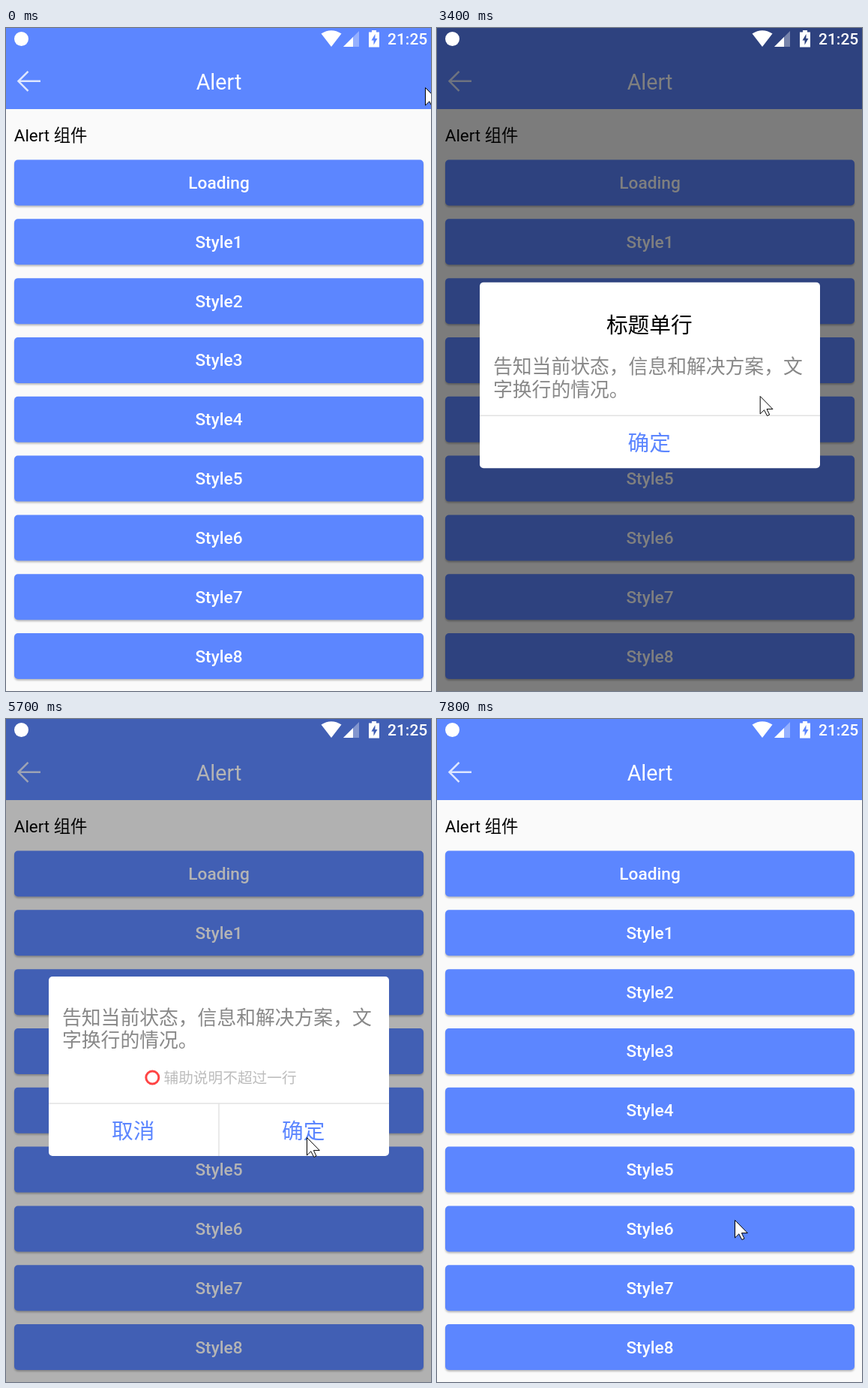
Animation, 567 px wide and 883 px high, one loop 8000 ms. Source, as an HTML page:

```html
<!DOCTYPE html>
<html lang="zh-CN">
<head>
<meta charset="utf-8">
<title>Alert</title>
<style>
html, body { margin: 0; width: 100%; height: 100%; overflow: hidden; background: #fafafa; }
svg { display: block; width: 567px; height: 883px; }
text { font-family: Roboto, "Noto Sans CJK SC", "Noto Sans CJK", sans-serif; }
.mid { text-anchor: middle; }
.btn { fill: #5c86ff; filter: drop-shadow(0 2px 1px rgba(0, 0, 0, .25)); }
.label { font-size: 22.7px; font-weight: 500; fill: #fff; }
.title { font-size: 28.7px; fill: #000; }
.msg { font-size: 25.8px; fill: #888; }
.hint { font-size: 19.7px; fill: #bdbdbd; }
.action { font-size: 28.7px; fill: #5c86ff; }
.rule { stroke: #e2e2e2; stroke-width: 1.4; }
</style>
</head>
<body>
<svg viewBox="0 0 567 883">
  <rect width="567" height="883" fill="#fafafa"/>
  <rect width="567" height="108" fill="#5c86ff"/>
  <path d="M46 70.8H17M29.5 57.8L16.5 70.8L29.5 83.8" fill="none" stroke="#fff" stroke-opacity=".8" stroke-width="2.5"/>
  <text class="mid" x="284" y="81.7" font-size="28.7" fill="#fff">Alert</text>
  <text x="10.8" y="150.5" font-size="22.4">Alert 组件</text>
  <g id="buttons"></g>
  <rect id="dim" width="567" height="883"/>
  <g fill="#fff">
    <circle cx="20.5" cy="14.5" r="9.5"/>
    <path d="M434 25L420.5 7.5Q434-1 447.5 7.5Z"/>
    <path d="M450 25H471V4Z" opacity=".35"/>
    <path d="M450 25H463V12Z"/>
    <path fill-rule="evenodd" d="M488 3h6v2.5h4V25.5h-14V5.5h4ZM492.5 8l-5 8.5h3v6l5-8.5h-3Z"/>
    <text x="509" y="22" font-size="21" font-weight="500">21:25</text>
  </g>
  <g id="dialog"></g>
  <path id="cursor" d="M.5.5V24L5.8 18.8L9.8 26.5L13 25L9.4 17.6H17.3Z" fill="#fff" stroke="#000"/>
</svg>
<script>
const LOOP = 8000, STEP = 100, CX = 284, CY = 462.5;
const FADE = 67, DIM = 220, MOVE = 300;
const [buttons, dim, dialog, cursor] =
  ['buttons', 'dim', 'dialog', 'cursor'].map(id => document.getElementById(id));

const popups = [
  { open: 480, close: 1040, loading: true },
  { open: 1780, close: 2440, actions: ['确定'] },
  { open: 3080, close: 3640, title: true, actions: ['确定'] },
  { open: 4343, close: 4760, title: true, actions: ['取消', '确定'] },
  { open: 5570, close: 6240, hint: 'ring', actions: ['取消', '确定'] },
  { open: 6880, close: 7540, title: true, hint: 'disc', actions: ['取消', '确定'] },
];

// pointer stops: arrival time, x, y; each move takes at most MOVE ms
const stops = [
  [0, 559, 79], [300, 447, 200], [1300, 434, 315], [1500, 436, 295], [2300, 460, 601],
  [2800, 452, 366], [3500, 420, 552], [4100, 398, 445], [4400, 388, 531],
  [5200, 405, 526], [5700, 401, 557], [6600, 402, 615], [7300, 397, 667],
];

const clamp = v => Math.max(0, Math.min(1, v));
const text = (cls, x, y, str) => `<text class="${cls}" x="${x}" y="${y}">${str}</text>`;

buttons.innerHTML = Array.from({ length: 9 }, (_, i) => {
  const y = 175.5 + i * 78.82;
  return `<rect class="btn" x="11" y="${y}" width="546" height="61" rx="5"/>` +
    text('label mid', CX, y + 38.5, i ? 'Style' + i : 'Loading');
}).join('');

function dialogMarkup({ title, hint, actions }) {
  const height = 190 + (title ? 57.5 : 0) + (hint ? 49 : 0);
  const top = CY - height / 2, bottom = CY + height / 2;
  const first = top + (title ? 121.5 : 64), rule = bottom - 70;
  const slot = 454 / actions.length;
  let out = `<rect x="57" y="${top}" width="454" height="${height}" rx="5" fill="#fff"/>`;
  if (title) out += text('title mid', CX - .7, top + 67.5, '标题单行');
  out += text('msg', 75, first, '告知当前状态，信息和解决方案，文') +
    text('msg', 75, first + 30.3, '字换行的情况。');
  if (hint) {
    const y = bottom - 104.5;
    out += hint === 'ring'
      ? `<circle cx="195.3" cy="${y}" r="8.5" fill="none" stroke="#ff4545" stroke-width="3"/>`
      : `<circle cx="195.3" cy="${y}" r="10" fill="#ff4545"/>`;
    out += text('hint', 210.5, y + 7.3, '辅助说明不超过一行');
  }
  out += `<path class="rule" d="M57 ${rule}H511${actions.length > 1 ? `M${CX} ${rule}V${bottom}` : ''}"/>`;
  return out + actions.map((name, i) =>
    text('action mid', 56.3 + slot * (i + .5), bottom - 23, name)).join('');
}

const spinnerMarkup =
  '<circle r="24" fill="none" stroke="#fff" stroke-width="4" stroke-dasharray="105 46"/>';
for (const p of popups) p.markup = p.loading ? spinnerMarkup : dialogMarkup(p);

function pointerAt(t) {
  const i = stops.findLastIndex(s => s[0] <= t);
  const [left, x, y] = stops[i];
  const [arrive, nx, ny] = stops[i + 1] || [LOOP, x, y];
  const begin = Math.max(left, arrive - MOVE);
  const k = clamp((t - begin) / (arrive - begin));
  return [x + (nx - x) * k, y + (ny - y) * k];
}

let shown = null;
function draw(now) {
  const t = Math.floor(now % LOOP / STEP) * STEP;
  const popup = popups.find(p => t >= p.open && t < p.close + DIM);
  let shade = 0, alpha = 0;
  if (popup) {
    const up = t - popup.open, down = Math.max(0, t - popup.close);
    // the backdrop fades slower than the box in front of it
    shade = .5 * clamp(up / DIM) * clamp(1 - down / DIM);
    alpha = clamp(up / FADE) * clamp(1 - down / FADE);
    if (popup !== shown) dialog.innerHTML = popup.markup;
    shown = popup;
    dialog.setAttribute('transform', `translate(${CX} ${CY}) ` + (popup.loading
      ? `rotate(${t * .36})` : `scale(${.9 + .1 * alpha}) translate(${-CX} ${-CY})`));
  }
  dim.setAttribute('opacity', shade);
  dialog.setAttribute('opacity', alpha);
  cursor.setAttribute('transform', `translate(${pointerAt(t)})`);
}

const start = performance.now();
(function frame() {
  draw(performance.now() - start);
  requestAnimationFrame(frame);
})();
</script>
</body>
</html>
```
